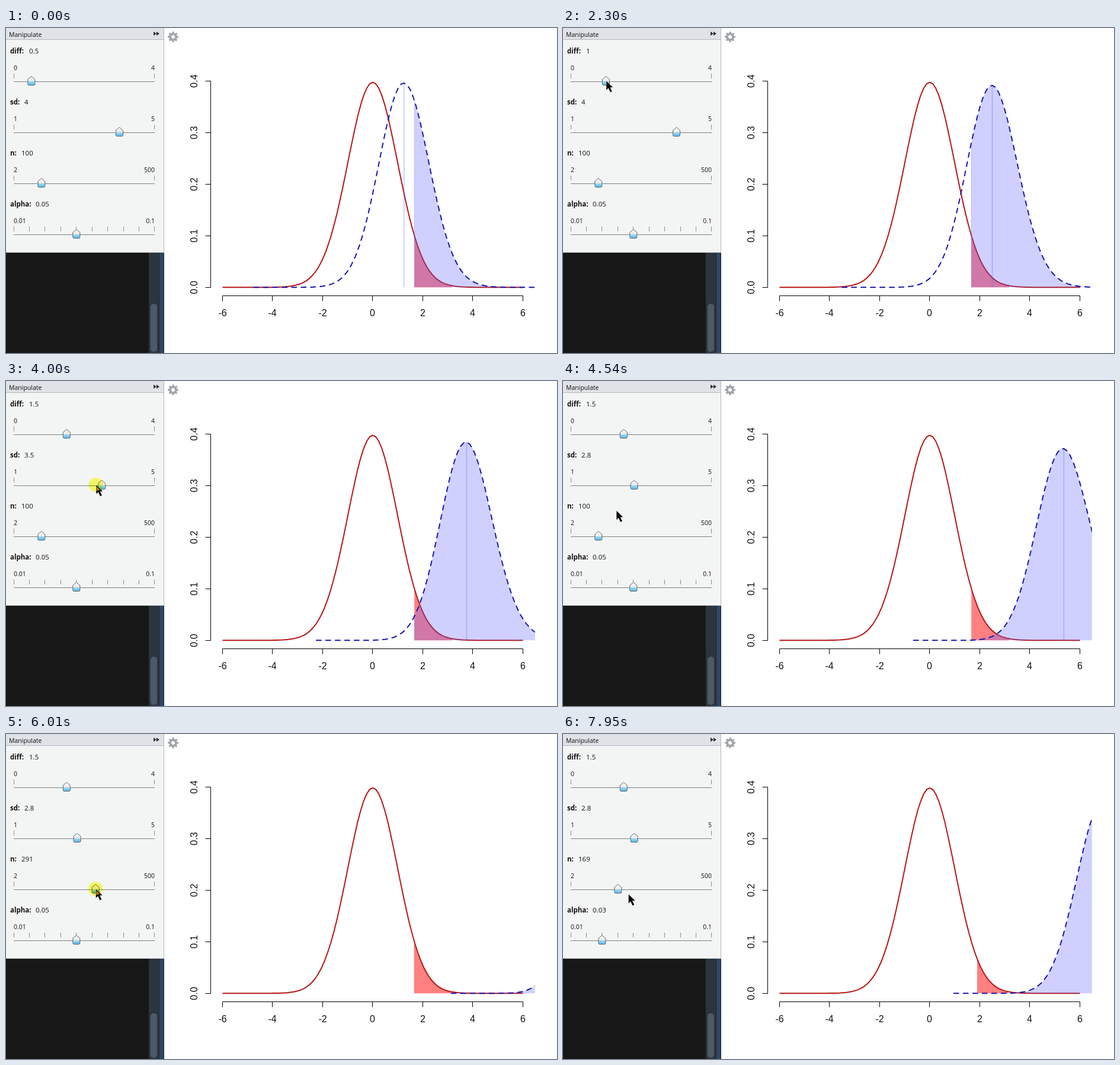
These frames come from a looping animation (930 by 548 pixels, 8 s). An HTML page:

```html
<!DOCTYPE html>
<html lang="en">
<head>
<meta charset="utf-8">
<style>
  html, body { margin: 0; width: 930px; height: 548px; overflow: hidden; background: #fff; }
  svg { display: block; }
  text { fill: #111; }
  .ui { font: 11.5px "Open Sans", sans-serif; }
  .ui .small { font-size: 10.5px; }
  .axis { font: 16px "Liberation Sans", sans-serif; text-anchor: middle; }
  .press { fill: #ffff50; fill-opacity: .85; mix-blend-mode: multiply; }
</style>
</head>
<body>
<svg width="930" height="548" viewBox="0 0 930 548">
  <defs>
    <linearGradient id="knob" x2="0" y2="1">
      <stop offset="0" stop-color="#fff"/>
      <stop offset=".57" stop-color="#e4e6e8"/>
      <stop offset=".6" stop-color="#9cd8f6"/>
      <stop offset="1" stop-color="#58b4e8"/>
    </linearGradient>
    <clipPath id="area"><path d="M345 60H892.8V452H345z"/></clipPath>
  </defs>
  <g id="back"></g>
  <g id="plot" clip-path="url(#area)" fill="none"></g>
  <g id="panel" class="ui"></g>
  <g id="pointer"></g>
</svg>
<script>
const LOOP = 8000;
const REDRAW = 200;   // from the end of a drag to the new plot
const TRAVEL = 300;   // pointer's way to the next slider
const KNOB_LAG = 40;
const $ = id => document.getElementById(id);
const span = n => [...Array(n).keys()];

const sliders = [
  { name: 'diff', min: 0, max: 4, digits: 1, x: 39, ticks: 2, value: .5 },
  { name: 'sd', min: 1, max: 5, digits: 1, x: 31, ticks: 2, value: 4 },
  { name: 'n', min: 2, max: 500, digits: 0, x: 26, ticks: 2, value: 100 },
  { name: 'alpha', min: .01, max: .1, digits: 2, x: 50, ticks: 10, value: .05 }
];
const [diff, sd, n, alpha] = sliders;

const drags = [
  { slider: diff, to: 1, start: 1500, end: 2100 },
  { slider: diff, to: 1.5, start: 2990, end: 3110 },
  { slider: sd, to: 2.8, start: 3780, end: 4190 },
  { slider: n, to: 291, start: 4940, end: 5280 },
  { slider: n, to: 169, start: 6030, end: 6200 },
  { slider: alpha, to: .03, start: 6890, end: 7050 }
];

function ease(t, start, end) {
  const u = Math.min(1, Math.max(0, (t - start) / (end - start)));
  return u * u * (3 - 2 * u);
}
const mix = (a, b, u) => a + (b - a) * u;

const rawValue = (s, t) => drags.filter(d => d.slider === s)
  .reduce((v, d) => mix(v, d.to, ease(t, d.start, d.end)), s.value);
const value = (s, t) => +rawValue(s, t).toFixed(s.digits);
const knobX = (s, v) => 13 + 238 * (v - s.min) / (s.max - s.min);

// The pointer visits each slider, follows its knob, then crosses the plot and returns
const stops = [
  { x: 43, y: 89, start: 210, end: 980 },
  ...drags.flatMap((d, i) => {
    const y = 89 + 86 * sliders.indexOf(d.slider);
    const leave = i ? drags[i - 1].end + REDRAW : 1080;
    return [
      { x: knobX(d.slider, rawValue(d.slider, d.start)), y, start: leave, end: leave + TRAVEL },
      { x: knobX(d.slider, d.to), y, start: d.start, end: d.end }
    ];
  }),
  { x: 463, y: 424, start: 7250, end: 7600 },
  { x: 110, y: 270, start: 7600, end: 7950 }
];
const pointerAt = t => stops.reduce((p, s) => {
  const u = ease(t, s.start, s.end);
  return { x: mix(p.x, s.x, u), y: mix(p.y, s.y, u) };
}, { x: 690, y: 458 });

// Noncentral t density, integrated over the scaled chi variable
function tDensity(df, ncp) {
  const width = 1 / Math.sqrt(2 * df);
  const nodes = span(41).map(i => {
    const s = 1 + (i - 20) / 4 * width;
    return [s, Math.exp((df - 1) * Math.log(s) - df * (s * s - 1) / 2)];
  });
  const total = nodes.reduce((sum, [, w]) => sum + w, 0) * Math.sqrt(2 * Math.PI);
  return x => nodes.reduce((sum, [s, w]) => sum + w * s * Math.exp(-((x * s - ncp) ** 2) / 2), 0) / total;
}

const px = x => 619 + 42.25 * x;
const py = y => 437.3 - 869 * y;
const point = (x, y) => px(x).toFixed(1) + ' ' + py(y).toFixed(1);
const curve = (f, a, b) => 'M' + span(101).map(i => {
  const x = mix(a, b, i / 100);
  return point(x, f(x));
}).join('L');
const filled = (f, a, b) => `${curve(f, a, b)}L${point(b, 0)}L${point(a, 0)}z`;

function drawPlot(t) {
  const size = value(n, t), df = size - 1;
  const ncp = value(diff, t) / value(sd, t) * Math.sqrt(size);
  const quantile = z => z + (z ** 3 + z) / (4 * df);
  const crit = quantile(value(alpha, t) > .04 ? 1.645 : 1.881);
  const h0 = tDensity(df, 0), h1 = tDensity(df, ncp);
  const end = Math.max(6.6, ncp + 6);
  const tint = 'rgb(100,100,255)';
  return `<path d="${filled(h0, crit, quantile(3.09))}" fill="#ff8080"/>
    <path d="${curve(h0, -6, 6)}" stroke="#b81616" stroke-width="2"/>
    <path d="${filled(h1, crit, end)}" fill="${tint}" fill-opacity=".3"/>
    <path d="M${point(crit, 0)}L${point(crit, h1(crit))}" stroke="${tint}" stroke-opacity=".3"/>
    <path d="M${point(ncp, 0)}L${point(ncp, h1(ncp))}" stroke="${tint}" stroke-opacity=".3" stroke-width="2"/>
    <path d="${curve(h1, ncp - 6, ncp + 6)}" stroke="#1616b4" stroke-width="2"
      stroke-dasharray="8" stroke-linecap="round"/>`;
}

function drawSlider(s, i, t) {
  const v = value(s, t);
  const ticks = span(s.ticks).map(k => `M${Math.floor(13 + 237.9 * k / (s.ticks - 1)) + .5} 77v8`).join('');
  return `<g transform="translate(0 ${86 * i})">
    <text x="7" y="43" font-weight="bold">${s.name}:</text>
    <text x="${s.x}" y="43">${v}</text>
    <text class="small" x="13" y="71">${s.min}</text>
    <text class="small" x="251" y="71" text-anchor="end">${s.max}</text>
    <path d="${ticks}" stroke="#8c8c8c"/>
    <path d="M13 90.5H251" stroke="#7c7f80"/>
    <path transform="translate(${knobX(s, v).toFixed(1)} 90)" d="M-6-3.5L0-8.5L6-3.5V4.5Q6 6.5 4 6.5H-4Q-6 6.5-6 4.5z"
      fill="url(#knob)" stroke="#60666c"/></g>`;
}

function drawPointer(t) {
  if (t < 210) return '';
  const during = (before, after) => drags.some(d => t >= d.start - before && t < d.end + after);
  const down = during(100, 60), warm = during(100, 150);
  const { x, y } = pointerAt(t);
  return `${down ? `<circle class="press" cx="${x}" cy="${y}" r="12"/>` : ''}
    <g transform="translate(${x} ${y})">
    <path d="M.5 0V16L4 12.5L7.3 19.5L10.5 18L7.3 11.3H12z" fill="#000" stroke="#fff" stroke-opacity=".6" stroke-width=".7"/>
    ${warm ? `<path d="M1.5 3V10L7 9z" fill="${down ? '#d08a10' : '#a03a20'}"/>` : ''}</g>`;
}

function drawGear(t) {
  const busy = drags.some(d => t >= d.end && t < d.end + REDRAW);
  return `<g fill="none" stroke="${busy ? '#bcc1c5' : '#a2a6a9'}" transform="translate(282 15) rotate(-11.25)">
    <circle r="5" stroke-width="4"/><circle r="7.5" stroke-width="3" stroke-dasharray="2.945"/></g>`;
}

function drawPanel(t) {
  const top = t < drags[3].end ? 465 : 471;
  return `<path d="M0 0H267V379H0z" fill="#f3f5f4"/><path d="M0 0H267V20H0z" fill="#dfe2e7"/>
    <path d="M0 19.5H267M266.5 0V378.5H0" fill="none" stroke="#b4b8be"/>
    <text class="small" x="5" y="15">Manipulate</text>
    <path d="M249 6L254 9.5L249 13zM254 6L259 9.5L254 13z" fill="#333"/>
    <path d="M0 379H241V548H0z" fill="#171717"/><path d="M241 379H259V548H241z" fill="#2c343d"/>
    <path d="M258 379H267V548H258z" fill="#2f4664"/><path d="M258.5 379V548M266.5 379V548" stroke="#1c2733"/>
    <rect x="244" y="${top}" width="11" height="${546 - top}" rx="5" fill="#4e5966"/>
    ${sliders.map((s, i) => drawSlider(s, i, t - KNOB_LAG)).join('')}${drawGear(t)}`;
}

function drawAxes() {
  const xs = span(7).map(i => 2 * i - 6), ys = span(5).map(i => i / 10);
  const tickX = x => Math.round(px(x)) - .5, tickY = y => Math.round(437 - 870 * y) + .5;
  return `<g class="axis"><path fill="none" stroke="#000" d="M365.5 451.5H872.5M345.5 89.5V437.5
    ${xs.map(x => `M${tickX(x)} 451.5v9`).join('')}${ys.map(y => `M345.5 ${tickY(y)}h-9`).join('')}"/>
    ${xs.map(x => `<text x="${tickX(x)}" y="486">${x}</text>`).join('')}
    ${ys.map(y => `<text transform="translate(323 ${tickY(y)}) rotate(-90)">${y.toFixed(1)}</text>`).join('')}</g>`;
}

$('back').innerHTML = drawAxes();
let plotted = -1;

function frame(now) {
  const t = now % LOOP;
  const done = drags.filter(d => d.end + REDRAW <= t).pop();
  const drawn = done ? done.end : 0;
  if (drawn !== plotted) $('plot').innerHTML = drawPlot(plotted = drawn);
  $('panel').innerHTML = drawPanel(t);
  $('pointer').innerHTML = drawPointer(t);
  requestAnimationFrame(frame);
}
frame(0);
</script>
</body>
</html>
```
